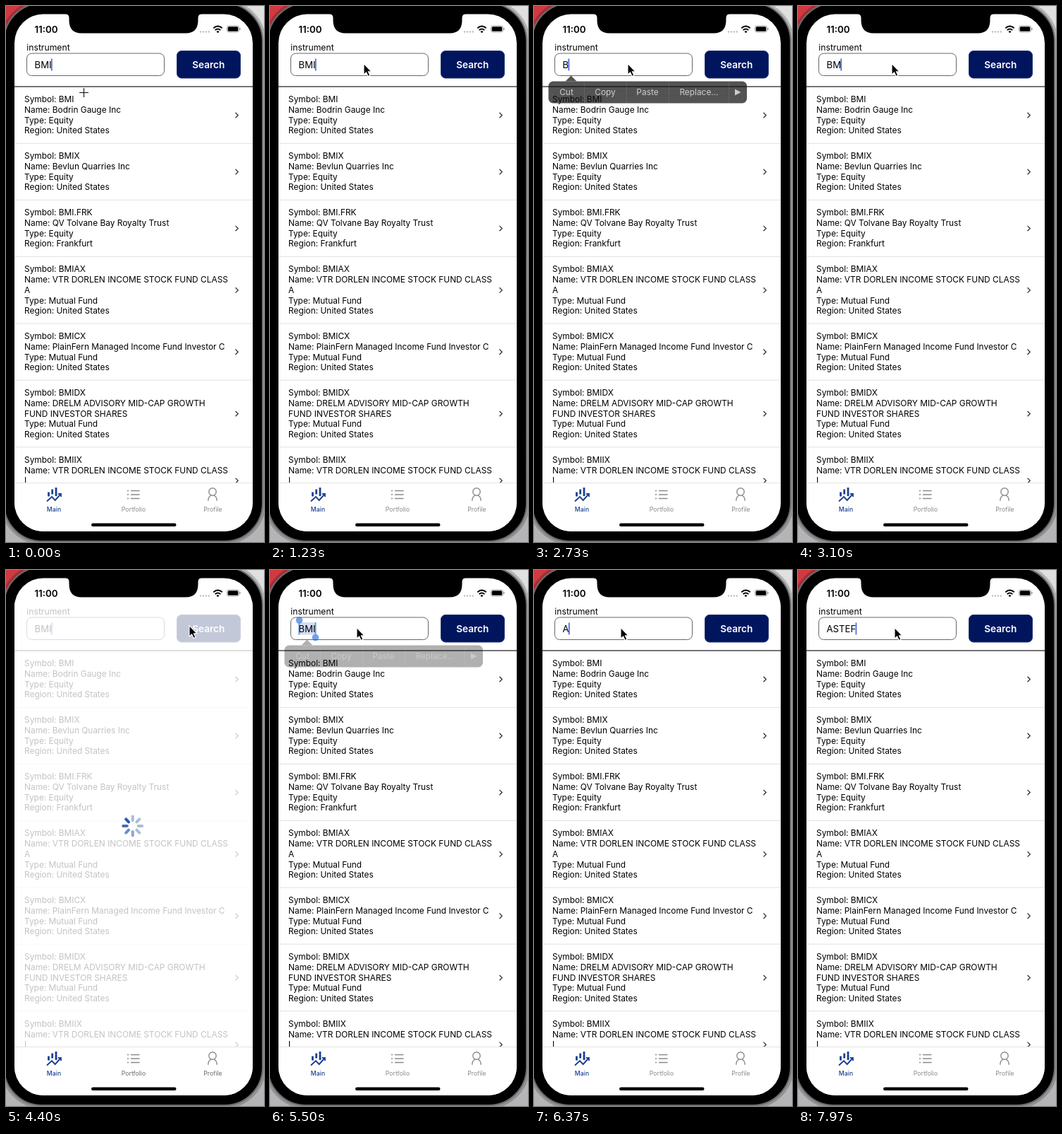
Animation of 366x758 px, one loop 8 s. Source, as an HTML page:

```html
<!DOCTYPE html>
<html lang="en">
<head>
<meta charset="utf-8">
<title>Instrument search</title>
<style>
  html, body { margin: 0; width: 100%; height: 100%; overflow: hidden; background: #d8d8d8; }
  svg { display: block; width: 366px; height: 758px; font-family: Inter, "Open Sans", sans-serif; }
  .row { font-size: 11.9px; fill: #000; }
  .tab { font-size: 8.7px; text-anchor: middle; }
  .mid { text-anchor: middle; }
</style>
</head>
<body>
<svg viewBox="0 0 366 758">
  <defs>
    <linearGradient id="desk" x2="0" y2="1">
      <stop offset="0" stop-color="#e0e0e0"/><stop offset=".5" stop-color="#d0d0d0"/><stop offset="1" stop-color="#b4b4b6"/>
    </linearGradient>
    <clipPath id="screen"><rect x="12" y="11.5" width="338" height="731.5" rx="41"/></clipPath>
    <clipPath id="listArea"><rect x="12" y="114" width="338" height="560"/></clipPath>
  </defs>

  <rect width="366" height="758" fill="url(#desk)"/>
  <rect width="60" height="60" fill="#cf3a40"/>
  <rect x="-3" y="-4" width="367" height="761" rx="54" stroke="#000" stroke-opacity=".2" stroke-width="9"/>
  <rect x="-3" y="-4" width="367" height="761" rx="54" stroke="#6c6c6f" stroke-width="2"/>

  <g clip-path="url(#screen)">
    <rect width="366" height="758" fill="#fff"/>

    <text x="29.3" y="63.3" font-size="12.2">instrument</text>
    <rect x="29.5" y="67" width="195" height="31.5" rx="7" fill="#fff" stroke="#666"/>
    <rect id="highlight" x="40.5" y="74" width="24.5" height="17.5" fill="#b9cdf0"/>
    <text id="query" x="40.5" y="87.8" font-size="13.2"></text>
    <rect id="caret" y="74.5" width="1.8" height="17" fill="#4a6fe0"/>
    <rect x="242.5" y="63.5" width="90" height="38.5" rx="6.5" fill="#00155e" stroke="#24356f"/>
    <text class="mid" x="287.3" y="87.8" font-size="13.6" font-weight="600" fill="#fff">Search</text>

    <g id="list" clip-path="url(#listArea)"></g>
    <path d="M12 114H350" stroke="#4a474c" stroke-width="1.4"/>

    <g id="handles" fill="#1766dc">
      <circle cx="41.5" cy="71" r="4.8"/><rect x="40.4" y="72" width="1.8" height="19.5"/>
      <circle cx="64.5" cy="95.5" r="4.8"/><rect x="63.8" y="74" width="1.8" height="20"/>
    </g>
    <g id="menu">
      <rect x="20.5" y="106.5" width="281.5" height="31" rx="6.5" fill="#0c0c0d" fill-opacity=".95"/>
      <path d="M44.5 106.5L52.5 98.5L60.5 106.5z" fill="#0c0c0d" fill-opacity=".95"/>
      <path d="M71.5 107V137M131.5 107V137M191.5 107V137M276.5 107V137" stroke="#333" stroke-width=".8"/>
      <g id="menuItems" class="mid" font-size="11.9" fill="#f4f4f4">
        <text x="46" y="126.4">Cut</text><text x="101" y="126.4">Copy</text>
        <text x="161" y="126.4">Paste</text><text x="234" y="126.4">Replace…</text>
        <path d="M285 117.5L293.5 122L285 126.5z"/>
      </g>
    </g>

    <g id="loading">
      <rect x="12" y="45" width="338" height="629" fill="#fff" opacity=".765"/>
      <g id="spinner" stroke="#13479c" stroke-width="4" stroke-linecap="round"></g>
    </g>

    <rect x="12" y="674" width="338" height="70" fill="#fff"/>
    <path d="M12 674.5H350" stroke="#dcdcde" stroke-width=".8"/>
    <g fill="none" stroke="#1a4093">
      <path d="M60.5 687.5V693.5M65.7 683.5V690.5M71 681V693" stroke-width="2.8"/>
      <path d="M58 700.5L65 694L69.7 699L77.3 690.5" stroke-width="1.9"/>
      <path d="M73.8 689.8H78V694" stroke-width="1.8"/>
    </g>
    <path d="M177 685.5H189.5M177 691H189.5M177 696.5H189.5M172 685.5H174M172 691H174M172 696.5H174" stroke="#8b8b8e" stroke-width="1.5"/>
    <g fill="none" stroke="#8b8b8e" stroke-width="1.4">
      <circle cx="293" cy="687" r="5.2"/>
      <path d="M286.8 699.8C286.8 695.5 288.5 693.2 291 692.2M299.2 699.8C299.2 695.5 297.500 693.2 295 692.2"/>
    </g>
    <text class="tab" x="68" y="714.5" fill="#1a4093" font-weight="500">Main</text>
    <g id="idleTabs" class="tab">
      <text x="181" y="714.5">Portfolio</text><text x="293.5" y="714.5">Profile</text>
    </g>
    <rect x="121" y="731.5" width="120.5" height="4.5" rx="2.25"/>

    <text class="mid" x="57" y="37.7" font-size="13.3" font-weight="600">11:00</text>
    <path d="M275 36.5H289" stroke="#b8b8b8" stroke-width="2.2" stroke-dasharray="2.2 1.7"/>
    <path d="M294.3 31.3Q300.5 25.7 306.7 31.3M296.6 34.1Q300.5 30.7 304.4 34.1" fill="none" stroke="#000" stroke-width="1.9"/>
    <path d="M298.4 36Q300.5 34.3 302.6 36L300.5 38.2z"/>
    <rect x="313.5" y="28" width="17" height="9" rx="2.6" fill="none" stroke="#999" stroke-width=".9"/>
    <rect x="314.7" y="29.2" width="14.6" height="6.6" rx="1.5"/>
    <path d="M332 31v3" stroke="#999" stroke-width="1.3"/>
  </g>
  <path d="M84 11Q89.5 11.5 89.5 17V20Q89.5 38.5 107 38.5H255Q272.5 38.5 272.5 20V17Q272.5 11.5 278 11z"/>

  <path id="cross" d="M-6.5 0H6.5M0-6.5V6.5" stroke="#111" stroke-width="1.1"/>
  <path id="arrow" d="M0-.5V15L3.600 11.800L6.200 17.500L8.900 16.300L6.400 10.900H11z" fill="#000" stroke="#fff" stroke-width="1.1"/>
</svg>
<script>
const LOOP = 8000, LINE = 14.68;
const $ = id => document.getElementById(id);

const results = [
  ["BMI", ["Bodrin Gauge Inc"], "Equity"],
  ["BMIX", ["Bevlun Quarries Inc"], "Equity"],
  ["BMI.FRK", ["QV Tolvane Bay Royalty Trust"], "Equity", "Frankfurt"],
  ["BMIAX", ["VTR DORLEN INCOME STOCK FUND CLASS", "A"], "Mutual Fund"],
  ["BMICX", ["PlainFern Managed Income Fund Investor C"], "Mutual Fund"],
  ["BMIDX", ["DRELM ADVISORY MID-CAP GROWTH", "FUND INVESTOR SHARES"], "Mutual Fund"],
  ["BMIIX", ["VTR DORLEN INCOME STOCK FUND CLASS", "I"], "Mutual Fund"],
];

let rowTop = 114.3;
$("list").innerHTML = results.map(([symbol, name, type, region = "United States"]) => {
  const lines = [`Symbol: ${symbol}`, `Name: ${name[0]}`, ...name.slice(1), `Type: ${type}`, `Region: ${region}`];
  const height = lines.length * LINE + 21.3, y = rowTop;
  rowTop += height;
  return lines.map((s, i) => `<text class="row" x="26" y="${y + 22.1 + i * LINE}">${s}</text>`).join("") +
    `<path d="M325.5 ${y + height / 2 - 3.5}l3.7 3.7l-3.7 3.7" fill="none" stroke="#333" stroke-width="1.3"/>` +
    `<path d="M12 ${rowTop}H350" stroke="#dedee0" stroke-width=".9"/>`;
}).join("");

$("spinner").innerHTML = Array.from({ length: 8 }, (_, i) =>
  `<path d="M0-8V-13.5" transform="translate(179.7 362) rotate(${i * 45})"/>`).join("");
const blades = [...$("spinner").children];

// [time, value] steps
const typing = [[0, "BMI"], [2700, "B"], [2950, "BM"], [3250, "BMI"],
  [6200, "A"], [6700, "AS"], [6900, "AST"], [7200, "ASTE"], [7450, "ASTEF"]];
// [time, x, y] pointer stops
const pointer = [[0, 110.5, 122.5], [350, 110.5, 122.5], [1000, 133, 82], [3450, 133, 82], [4000, 260, 79],
  [4550, 260, 79], [5050, 123, 82], [6800, 123, 82], [7600, 137, 82]];
const selections = [[1400, 1600, 2700], [5200, 5450, 6200]]; // selected, menu opens, typed over
const busy = [4230, 4870];

const clamp = v => Math.max(0, Math.min(1, v));
const ease = v => v * v * (3 - 2 * v);
const show = (id, opacity) => $(id).setAttribute("opacity", opacity);

function pointerAt(t) {
  const i = pointer.findLastIndex(p => p[0] <= t);
  const [t0, x0, y0] = pointer[i], [t1, x1, y1] = pointer[i + 1] || [LOOP, x0, y0];
  const k = ease((t - t0) / (t1 - t0));
  return [x0 + (x1 - x0) * k, y0 + (y1 - y0) * k];
}

function draw(t) {
  $("query").textContent = typing.findLast(s => s[0] <= t)[1];
  $("caret").setAttribute("x", 39.8 + $("query").getComputedTextLength());

  const selected = selections.some(([from, , to]) => t >= from && t < to);
  const menu = Math.max(...selections.map(([, open, close]) =>
    Math.min(clamp((t - open) / 150), clamp(1 - (t - close) / 120))));
  show("highlight", selected ? .5 + .5 * menu : 0);
  show("caret", +!selected);
  show("handles", selected ? .4 + .6 * menu : 0);
  show("menu", menu);
  show("menuItems", menu);

  const loading = t >= busy[0] && t < busy[1];
  show("loading", +loading);
  $("idleTabs").setAttribute("fill", loading ? "#6a6a6d" : "#8b8b8e");
  const lead = Math.floor((t - busy[0]) / 125) + 6;
  blades.forEach((b, i) => b.setAttribute("opacity", [.9, .78, .62, .48][(((lead - i) % 8) + 8) % 8] || .36));

  const [x, y] = pointerAt(t), crosshair = t < 700;
  $("cross").setAttribute("transform", `translate(${x} ${y})`);
  $("arrow").setAttribute("transform", `translate(${x} ${y})`);
  show("cross", +crosshair);
  show("arrow", +!crosshair);
}

(function tick() {
  draw(performance.now() % LOOP);
  requestAnimationFrame(tick);
})();
</script>
</body>
</html>
```
